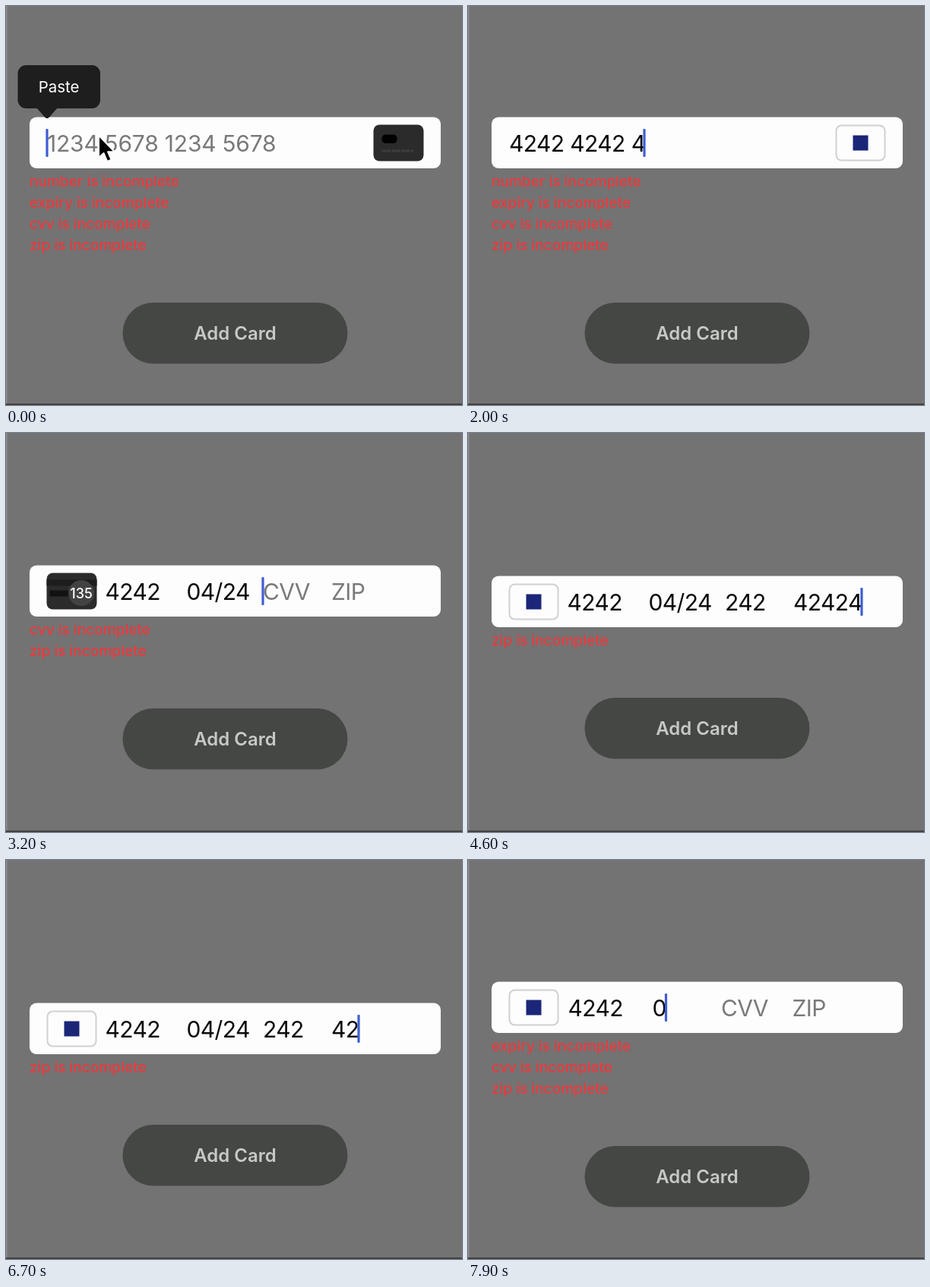
An HTML page that plays this animation: 600 px wide and 526 px high, repeating every 8000 ms.

```html
<!DOCTYPE html>
<html lang="en">
<head>
<meta charset="utf-8">
<title>Card entry</title>
<style>
html, body { margin: 0; width: 100%; height: 100%; overflow: hidden; background: #737373; }
svg { display: block; width: 100%; height: 100%; font-family: Inter, Roboto, sans-serif; }
.value { font-size: 30px; letter-spacing: -.6px; white-space: pre; }
.error { font-size: 19.1px; font-weight: 500; fill: #ee383c; }
</style>
</head>
<body>
<svg viewBox="0 0 600 526">
  <defs>
    <clipPath id="view"><rect x="52" y="0" width="499" height="68"/></clipPath>
  </defs>
  <rect width="600" height="526" fill="#737373"/>
  <rect width="1.6" height="526" fill="#8b8b8b"/>
  <rect y="524" width="600" height="2" fill="#424242"/>

  <g id="errors"></g>

  <g id="field">
    <rect x="31" width="541" height="67.5" rx="9" fill="#fdfdfd"/>
    <g clip-path="url(#view)">
      <g id="strip">
        <text id="number" class="value" x="54" y="45"></text>
        <g id="icon">
          <g id="front">
            <g id="blank">
              <rect x="-33" y="-24" width="66" height="48" rx="8" fill="#2b2b2b"/>
              <rect x="-22" y="-11" width="20" height="11.5" rx="5" fill="#000"/>
              <path d="M-22 10.5H20" stroke="#444" stroke-width="3" stroke-dasharray="2 1 2 1 2 1 2 2"/>
            </g>
            <g id="brand">
              <rect x="-32" y="-23" width="64" height="46" rx="7" fill="#fdfdfd" stroke="#d0d0d0" stroke-width="2"/>
              <rect x="-10" y="-10" width="20" height="20" fill="#1b2678"/>
            </g>
          </g>
          <g id="back">
            <rect x="-33" y="-24" width="66" height="48" rx="8" fill="#2b2b2b"/>
            <rect x="-33" y="-15" width="66" height="8" fill="#1d1d1d"/>
            <rect x="-29" y="-1" width="26" height="8" fill="#121212"/>
            <circle cx="12.5" cy="2.5" r="17" fill="#424242"/>
            <text x="12.5" y="9" text-anchor="middle" font-size="18" font-weight="500" fill="#fff">135</text>
          </g>
        </g>
        <text id="last4" class="value" y="45">4242</text>
        <text id="expiry" class="value" y="45"></text>
        <text id="cvv" class="value" y="45"></text>
        <text id="zip" class="value" y="45"></text>
        <rect id="caret" y="15.5" width="3.2" height="37" rx="1.2" fill="#3f5dd2"/>
      </g>
    </g>
  </g>

  <g id="button">
    <rect id="pill" x="153.5" width="296" height="80.5" rx="40.2"/>
    <text id="label" x="301.5" y="48.5" text-anchor="middle" font-size="24" font-weight="600">Add Card</text>
  </g>

  <g id="menu">
    <path d="M40 134H68L57 146.500Q54 150 51 146.500Z" fill="#1e1e1e"/>
    <rect x="15.500" y="78" width="108.500" height="57" rx="11" fill="#1e1e1e"/>
    <text x="69.500" y="113.500" text-anchor="middle" font-size="20.400" fill="#fff">Paste</text>
  </g>
  <path id="pointer" d="M122 170.500V200L128.500 194L133.200 205L138.600 202.700L134 192.200H143Z"
    fill="#000" stroke="#fff" stroke-width="2" stroke-linejoin="round"/>
</svg>
<script>
const LOOP = 8000;
const SCROLL = 430;
const FIELD_TOP = [205.5, 188.5, 174.5, 160.5, 146.5];
const BUTTON_TOP = [332, 349, 363, 377, 391];
const INK = '#0a0a0a', HINT = '#797979';

// Times of key presses: typed and deleted characters per input
const numberKeys = Array.from({ length: 16 }, (_, i) =>
  i < 9 ? 700 + 155 * i : 2080 + 87 * (i - 9));
const keys = {
  number: { add: numberKeys, del: [] },
  expiry: { add: [2720, 2800, 2880, 2960], del: [7460, 7580, 7720] },
  cvv: { add: [3320, 3440, 3560], del: [6980, 7100, 7220] },
  zip: { add: [3740, 3900, 4080, 4300, 4500, 4800], del: [6200, 6320, 6440, 6560, 6710, 6810] }
};
const names = Object.keys(keys);
const focusSteps = [[0, 'number'], [2602, 'expiry'], [2960, 'cvv'], [3560, 'zip'], [6900, 'cvv'], [7340, 'expiry']];

const el = {};
document.querySelectorAll('[id]').forEach(e => el[e.id] = e);
const lines = names.map(() => {
  const line = document.createElementNS('http://www.w3.org/2000/svg', 'text');
  line.setAttribute('class', 'error');
  line.setAttribute('x', 31);
  el.errors.append(line);
  return line;
});

const set = (e, attrs) => { for (const k in attrs) e.setAttribute(k, attrs[k]); };
const ramp = (t, from, to) => Math.min(1, Math.max(0, (t - from) / (to - from)));
const ease = x => x * x * (3 - 2 * x);
const passed = (list, t) => list.filter(at => at <= t).length;
const move = (e, x, y) => set(e, { transform: `translate(${x} ${y})` });

const format = {
  number: n => '4242424242424242'.slice(0, n).replace(/(.{4})(?=.)/g, '$1 '),
  expiry: n => n > 2 ? '04/' + '24'.slice(0, n - 2) : '04'.slice(0, n),
  cvv: n => '242'.slice(0, n),
  zip: n => '424242'.slice(0, n)
};
const hints = { number: '1234 5678 1234 5678', expiry: 'MM/YY', cvv: 'CVV', zip: 'ZIP' };
const textWidth = s => [...s].reduce((w, c) => w + (c === ' ' ? 8 : c === '/' ? 9 : 18), 0);

function caretOpacity(t) {
  if (t < 700) return 1 - ramp(t, 50, 200) + ramp(t, 350, 500);
  return 1 - ramp(t, 5350, 5500) + ramp(t, 5650, 5900);
}

function flipAmount(t) {
  const flip = at => ease(ramp(t, at, at + 220));
  return flip(2960) - flip(3560) + flip(6900) - flip(7340);
}

function draw(t) {
  const count = {}, text = {};
  for (const n of names) {
    count[n] = passed(keys[n].add, t) - passed(keys[n].del, t);
    text[n] = format[n](count[n]);
  }

  const missing = names.filter(n => count[n] < keys[n].add.length);
  const top = FIELD_TOP[missing.length];
  move(el.field, 0, top);
  move(el.button, 0, BUTTON_TOP[missing.length]);
  lines.forEach((line, i) => {
    line.textContent = missing[i] ? missing[i] + ' is incomplete' : '';
    line.setAttribute('y', top + 91.5 + 28 * i);
  });

  const ready = !missing.length;
  set(el.pill, { fill: ready ? '#f3f4f8' : '#454745' });
  set(el.label, { fill: ready ? '#1b1b1d' : '#c7c9c7' });

  // Input columns settle once the expiry is complete
  const full = count.expiry === 4;
  const [xLast, xExpiry, xCvv, xZip] = full ? [130.5, 237.5, 338, 428] : [131.5, 242.5, 333, 426.5];
  const left = { number: 54, expiry: xExpiry + SCROLL, cvv: xCvv + SCROLL, zip: xZip + SCROLL };
  set(el.last4, { x: xLast + SCROLL, fill: INK });
  for (const n of names) {
    el[n].textContent = text[n] || hints[n];
    set(el[n], { x: left[n], fill: text[n] ? INK : HINT });
  }
  el.number.style.letterSpacing = text.number ? '' : '-.2px';

  move(el.strip, -SCROLL * ease(ramp(t, 2602, 2860)), 0);

  const focus = focusSteps.filter(s => s[0] <= t).pop()[1];
  set(el.caret, {
    x: left[focus] + textWidth(text[focus]) - 1.6,
    opacity: caretOpacity(t)
  });

  const turn = Math.cos(Math.PI * flipAmount(t));
  set(el.icon, { transform: `translate(516.5 34) scale(${Math.max(.01, Math.abs(turn))} 1)` });
  const show = (e, on) => set(e, { visibility: on ? 'visible' : 'hidden' });
  show(el.back, turn < 0);
  show(el.blank, turn >= 0 && !count.number);
  show(el.brand, turn >= 0 && count.number > 0);

  set(el.menu, { opacity: 1 - ramp(t, 350, 500) });
  show(el.pointer, t < 700);
}

function tick() {
  draw(performance.now() % LOOP);
  requestAnimationFrame(tick);
}
tick();
</script>
</body>
</html>
```
